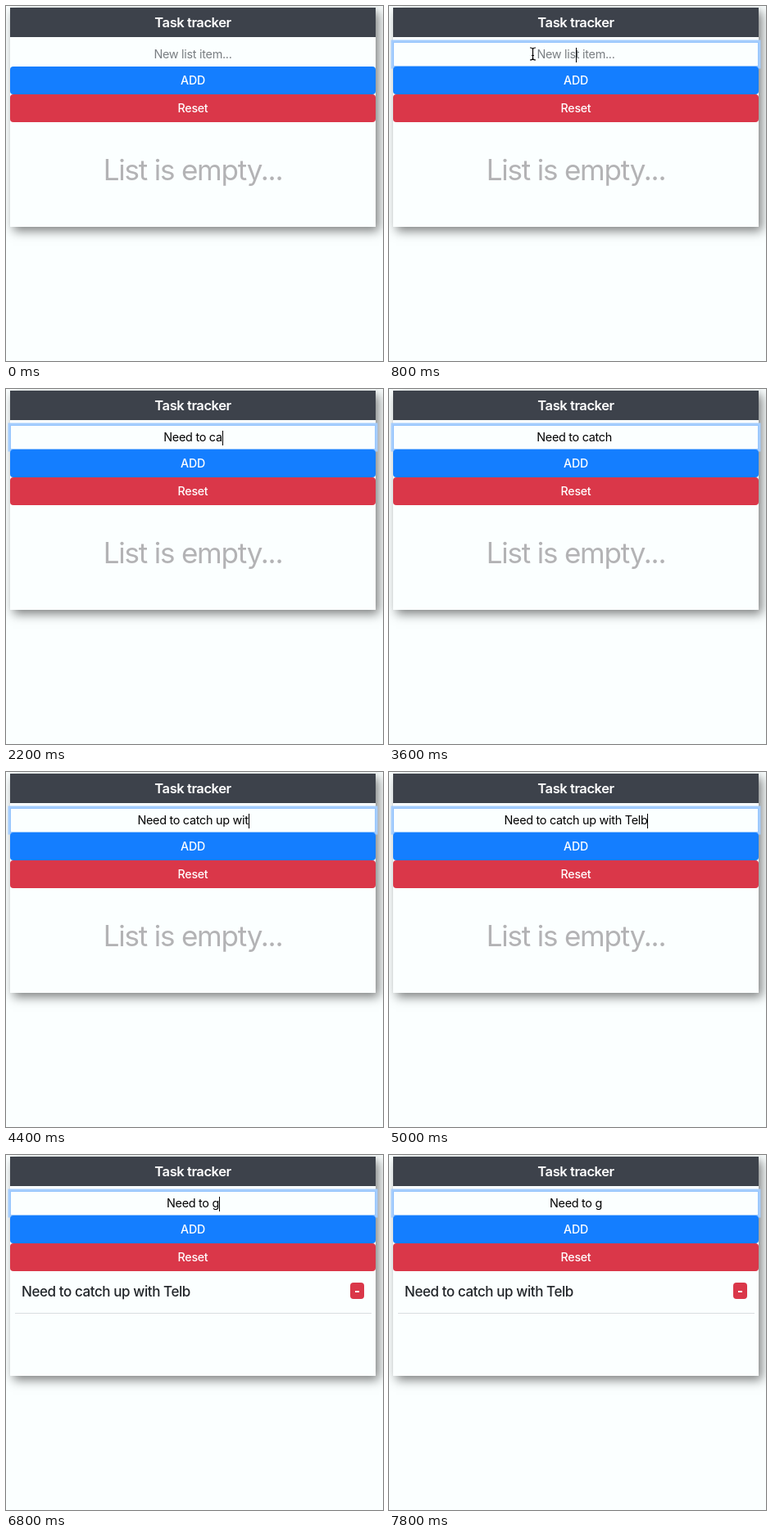
An HTML page that plays this animation: 460 px wide and 434 px high, repeating every 8000 ms.

```html
<!DOCTYPE html>
<html lang="en">
<head>
<meta charset="utf-8">
<title>Task tracker</title>
<style>
  html, body { margin: 0; width: 100%; height: 100%; overflow: hidden; background: #fbffff; }
  body { position: relative; font-family: Inter, "Open Sans", sans-serif; font-optical-sizing: none; }
  .card, .card > *, .remove, .pointer { position: absolute; box-sizing: border-box; }
  .card { left: 5px; top: 2px; width: 446px; height: 268px; background: #fbffff;
    box-shadow: 4px 5px 12px rgba(0, 0, 0, .5); }
  .card > * { left: 0; width: 100%; text-align: center; white-space: pre; }
  .title { top: 0; height: 36px; background: #3d424b; color: #fff;
    font-size: 16.5px; font-weight: 600; line-height: 37px; letter-spacing: -.42px; }
  .field { top: 42px; height: 30px; font-size: 14.4px; line-height: 30px; letter-spacing: -.28px; color: #000; }
  .field.focus { box-shadow: 0 0 0 2.5px #a5cdfd, inset 0 0 0 1px #95c5fd; }
  .field.blank { color: #7a7e82; }
  .caret { position: absolute; top: 7px; width: 1px; height: 18px; background: #000; }
  .blank .caret { left: 223px; }
  .button { height: 34px; border-radius: 4px; color: #fff;
    font-size: 14.2px; font-weight: 500; line-height: 34px; letter-spacing: -.26px; }
  .add { top: 72px; background: #147eff; }
  .reset { top: 106px; background: #da3749; }
  .empty { top: 173px; height: 50px; color: #b3b3b5;
    font-size: 35px; line-height: 50px; letter-spacing: -1.2px; }
  .card > .item { left: 6px; top: 140px; width: 435px; height: 52px; padding-left: 8px;
    border-bottom: 1px solid #d9dde0; color: #212529; text-align: left;
    font-size: 17px; font-weight: 500; line-height: 50px; letter-spacing: -.42px; }
  .remove { left: 409px; top: 14px; width: 17px; height: 20px; border-radius: 4px; background: #da3749; }
  .remove::after { content: ""; position: absolute; left: 6px; top: 10px; width: 5px; height: 2px; background: #fff; }
  .pointer { left: 170px; top: 49px; width: 11px; height: 19px; }
  [hidden] { display: none; }
</style>
</head>
<body>
  <div class="card">
    <div class="title">Task tracker</div>
    <div class="field"><span class="text"></span><span class="caret"></span></div>
    <div class="button add">ADD</div>
    <div class="button reset">Reset</div>
    <div class="empty">List is empty...</div>
    <div class="item" hidden><span class="label"></span><span class="remove"></span></div>
  </div>
  <svg class="pointer" viewBox="0 0 11 19" fill="none">
    <path id="beam" d="M2 2 Q5.5 2 5.5 4 Q5.5 2 9 2 M5.5 4 V15 M2 17 Q5.5 17 5.5 15 Q5.5 17 9 17 M4 11.5 H7" stroke="#fff" stroke-width="3"/>
    <use href="#beam"/>
    <path d="M2 2 Q5.5 2 5.5 4 Q5.5 2 9 2 M5.5 4 V15 M2 17 Q5.5 17 5.5 15 Q5.5 17 9 17 M4 11.5 H7" stroke="#000" stroke-width="1.2"/>
  </svg>
<script>
  const LOOP = 8000, ADDED = 5400, FOCUS = 600;
  const first = "Need to catch up with Telb";
  const second = "Need to get";

  // Each pair is [time, number of typed characters].
  const typing = [[0, 0], [1200, 1], [1400, 3], [1600, 4], [1800, 6], [2000, 9], [2200, 10],
    [2400, 11], [2600, 12], [2800, 14], [3800, 15], [4000, 17], [4200, 18], [4400, 20],
    [4600, 22], [4800, 24], [5000, 26], [ADDED, 0], [6000, 1], [6200, 2], [6400, 4],
    [6600, 7], [6800, 9], [7000, 11], [7200, 10], [7400, 9]];
  const caretOff = [[0, FOCUS], [3400, 3800], [5800, 6000], [7800, LOOP]];

  const find = selector => document.querySelector(selector);
  const field = find(".field"), text = find(".text"), caret = find(".caret");
  const empty = find(".empty"), item = find(".item"), pointer = find(".pointer");
  const within = (t, [from, to]) => t >= from && t < to;
  find(".label").textContent = first;

  function draw(t) {
    const count = typing.findLast(([time]) => time <= t)[1];
    const added = t >= ADDED;
    const value = (added ? second : first).slice(0, count) || "New list item...";
    if (text.textContent !== value) text.textContent = value;
    field.classList.toggle("blank", !count);
    field.classList.toggle("focus", t >= FOCUS);
    caret.hidden = caretOff.some(span => within(t, span));
    empty.hidden = added;
    item.hidden = !added;
    pointer.style.display = within(t, [400, 1200]) ? "" : "none";
  }

  const start = performance.now();
  function tick() {
    draw((performance.now() - start) % LOOP);
    requestAnimationFrame(tick);
  }
  tick();
</script>
</body>
</html>
```
